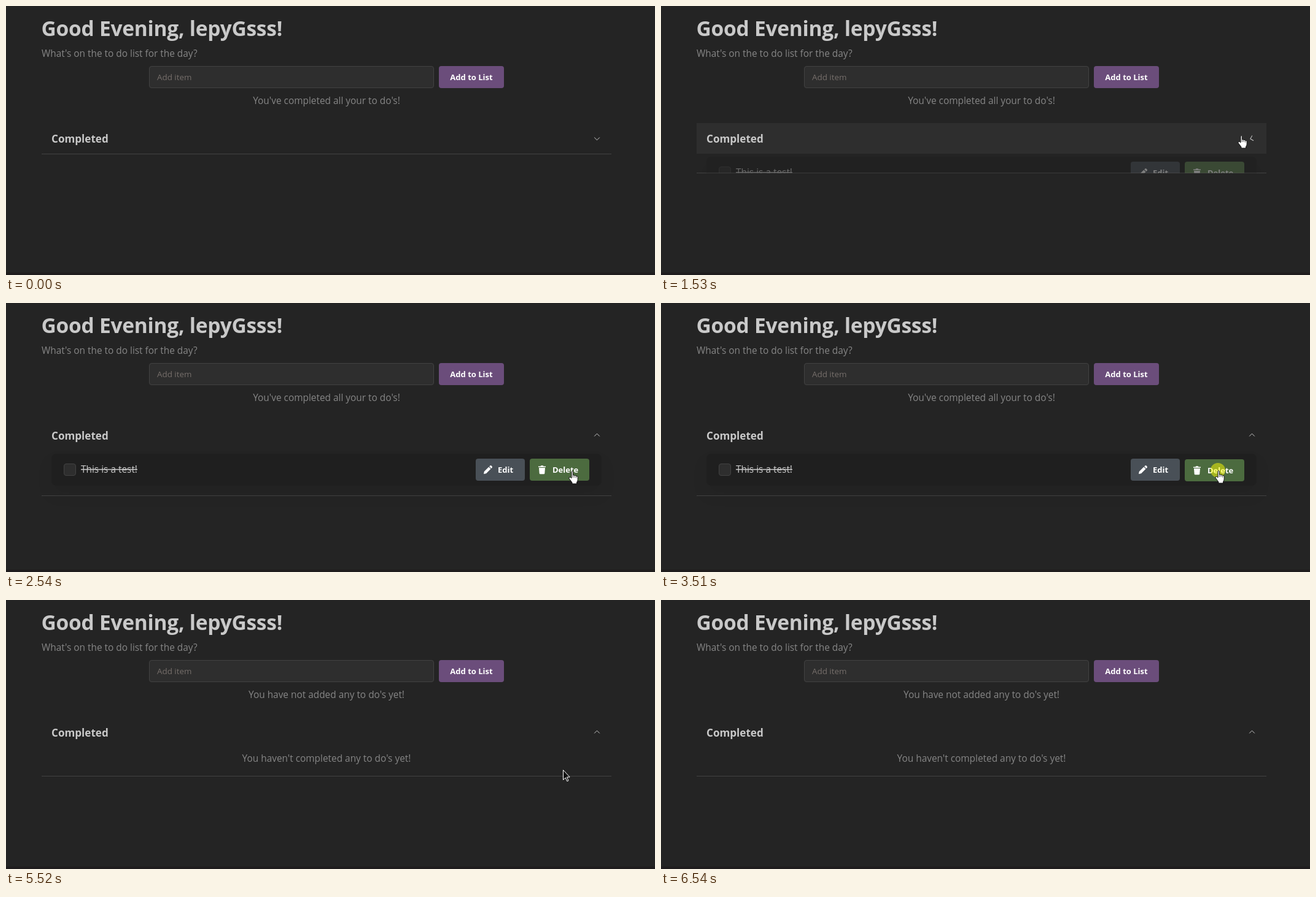
These frames come from a looping animation (1057x439 px, 7.34 s). An HTML page:

```html
<!DOCTYPE html>
<html lang="en">
<head>
<meta charset="utf-8">
<title>To do list</title>
<style>
  html, body { margin: 0; width: 100%; height: 100%; overflow: hidden; background: #242424; }
  svg { display: block; font: 15.4px "Open Sans", "Noto Sans", sans-serif; fill: #c9c9c9; }
  .title { font-size: 33.5px; font-weight: 700; letter-spacing: -.25px; }
  .head { font-size: 17.1px; font-weight: 700; }
  .dim { fill: #868686; }
  .mid { text-anchor: middle; }
  .hint { font-size: 13.4px; fill: #766f6b; }
  .btn { font-size: 13px; font-weight: 700; fill: #fff; }
  .field { fill: #2e2e2e; stroke: #424242; }
  .card { fill: #1f1f1f; filter: drop-shadow(0 14px 12px rgba(0, 0, 0, .05)); }
  .strike { text-decoration: line-through; }
</style>
</head>
<body>
<svg width="1057" height="439" viewBox="0 0 1057 439">
  <clipPath id="clip"><rect id="clipBox" y="242" width="1057"/></clipPath>
  <rect y="435" width="1057" height="4" fill="#1f1d1e"/>

  <text class="title" x="57.5" y="49">Good Evening, lepyGsss!</text>
  <text class="dim" x="58" y="83">What's on the to do list for the day?</text>
  <rect class="field" x="233.5" y="98.5" width="463" height="35" rx="3.5"/>
  <text class="hint" x="246" y="121">Add item</text>
  <rect x="705" y="98" width="106" height="36" rx="4" fill="#6b4d7b"/>
  <text class="btn mid" x="758" y="121">Add to List</text>
  <text class="dim mid" id="message" x="522" y="160"></text>

  <rect id="row" x="58" y="191" width="928" height="50" fill="#2e2e2e"/>
  <text class="head" x="74" y="223">Completed</text>
  <path id="chevron" d="M958.2 214.5l4.3 4.3 4.3-4.3" fill="none" stroke="#c9c9c9"/>
  <rect id="line" x="58" width="928" height="1" fill="#424242"/>

  <g clip-path="url(#clip)">
    <g id="item">
      <rect class="card" x="74" y="246" width="896" height="52" rx="8"/>
      <rect class="field" x="94.5" y="262.5" width="19" height="19" rx="3.5"/>
      <text class="strike" x="122" y="277">This is a test!</text>
      <g class="btn">
        <rect x="765" y="254" width="80" height="36" rx="4" fill="#495057"/>
        <path d="M778 279l.8-4 7.5-7.5 3.2 3.2-7.5 7.5zM787.2 266.7l1.2-1.2q1-.8 2 0l1.2 1.2q.8 1 0 2l-1.2 1.2z"/>
        <text x="801" y="277">Edit</text>
      </g>
      <g class="btn" id="del">
        <rect id="delBox" x="853" y="254" width="97" height="36" rx="4"/>
        <path d="M867 266.5h3.5l.8-1.3h3.4l.8 1.3h3.5v1.6h-12zM868 269h10l-.7 9q-.1 1.2-1.3 1.2h-6q-1.2 0-1.3-1.2z"/>
        <text x="890" y="277">Delete</text>
      </g>
    </g>
  </g>
  <text class="dim mid" id="empty" x="522" y="264">You haven't completed any to do's yet!</text>

  <g id="pointer">
    <circle id="press" r="12" fill="#ff0" opacity=".5"/>
    <path id="arrow" d="M.5.5V16.5L4.2 13 6.8 18.8 9 17.8 6.5 12H11.2Z" fill="#111" stroke="#fff"/>
    <g id="hand" stroke="#111">
      <path fill="#fff" d="M0 1.5Q1.2-.3 2.4 1.5V7Q4 6.3 5 7.6 6.8 7 7.6 8.4 10 8 10.2 10.3V14.5Q10 17 8.6 18.5V21H1V19L-3.8 12.6Q-4.6 10.4-2.8 10.2-1.4 10.3 0 12Z"/>
      <path fill="none" stroke-width=".7" d="M2.4 7v4M5 8v3M7.6 8.6v3"/>
    </g>
  </g>
</svg>
<script>
const LOOP = 7340, STEP = 67;
const OPEN = 1440, CLICK = 3510, REMOVE = 3640;
// The pointer is sampled in bursts that begin at these times.
const bursts = [0, 1060, 1930, 2680, CLICK, 5520, 6260];
// Pointer path: time, x, y
const path = [
  [1060, 1037, 199], [1127, 1000, 204], [1194, 962, 210], [1261, 945, 211], [1328, 944, 211],
  [1929, 944, 211], [1930, 948, 212], [2064, 961, 215], [2198, 980, 230], [2332, 972, 255],
  [2466, 930, 275], [2600, 911, 273], [2680, 909, 273], [2747, 907, 273],
  [5519, 907, 273], [5520, 907, 277], [6190, 907, 333], [6260, 906, 345], [6461, 898, 419]
];

const $ = id => document.getElementById(id);
const set = (id, name, value) => $(id).setAttribute(name, value);
const show = (id, on) => set(id, "visibility", on ? "visible" : "hidden");
const within = (t, from, to) => t >= from && t < to;
const ease = (t, from, length) => {
  const p = Math.min(1, Math.max(0, (t - from) / length));
  return p * p * (3 - 2 * p);
};

function pointerAt(t) {
  const i = path.findIndex(k => k[0] > t);
  if (i < 1) return path[i < 0 ? path.length - 1 : 0].slice(1);
  const [t0, x0, y0] = path[i - 1], [t1, x1, y1] = path[i];
  const p = (t - t0) / (t1 - t0);
  return [x0 + (x1 - x0) * p, y0 + (y1 - y0) * p];
}

function draw(time) {
  const start = bursts.filter(b => b <= time).pop();
  const t = start + Math.floor((time - start) / STEP) * STEP;
  const [x, y] = pointerAt(t).map(Math.round);
  const open = ease(t, OPEN, 200), gone = ease(t, REMOVE, 220);
  const visible = within(t, 1060, 6500);
  const overRow = visible && within(x, 58, 986) && within(y, 191, 242);
  const overDelete = visible && t < REMOVE && within(x, 853, 950) && within(y, 254, 290);
  const pressed = within(t, CLICK, REMOVE);

  $("message").textContent = t < REMOVE ? "You've completed all your to do's!" : "You have not added any to do's yet!";
  show("row", overRow);
  set("chevron", "transform", `rotate(${180 * open} 962.5 216)`);
  set("line", "y", 241 + Math.round(73 * open - 27 * gone));
  set("clipBox", "height", open < 1 ? 73 * open : 197);
  set("item", "opacity", open * (1 - gone));
  set("empty", "opacity", gone);
  set("del", "transform", `translate(0 ${pressed ? 1 : 0})`);
  set("delBox", "fill", overDelete ? "#4c6b3f" : "#5c7e4d");

  set("pointer", "transform", `translate(${x} ${y})`);
  const hand = overRow || overDelete;
  show("hand", visible && hand);
  show("arrow", visible && !hand);
  show("press", within(t, 1320, 1460) || pressed);
}

let begin;
function tick(now) {
  begin ??= now;
  draw((now - begin) % LOOP);
  requestAnimationFrame(tick);
}
draw(0);
requestAnimationFrame(tick);
</script>
</body>
</html>
```
